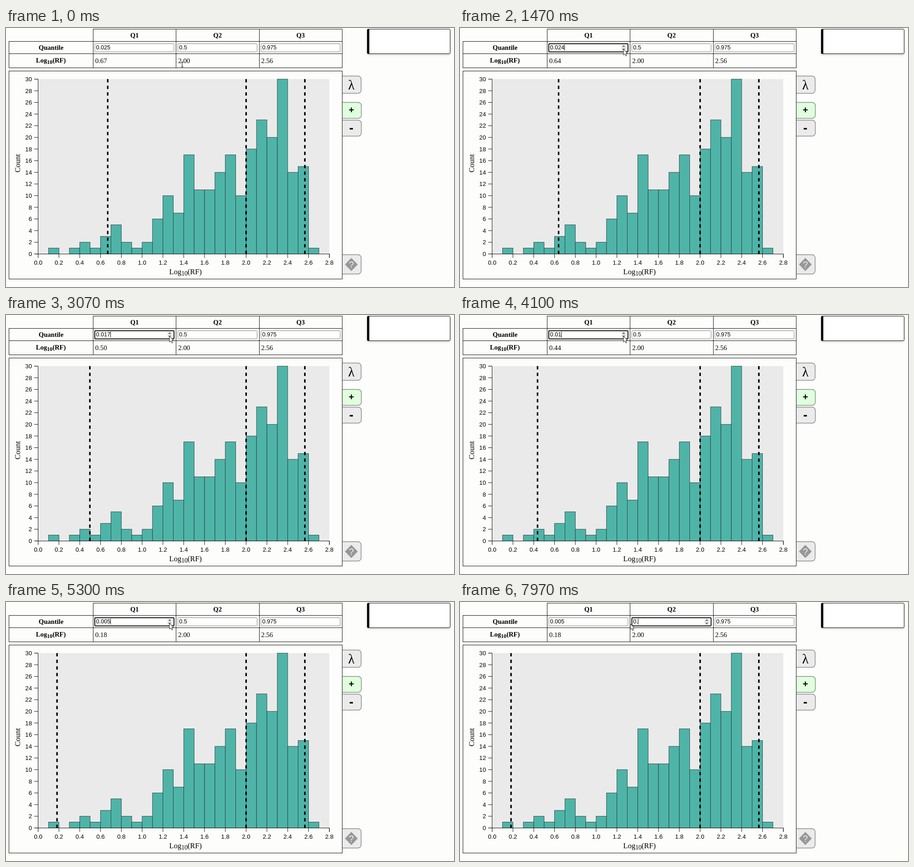
An HTML page that plays this animation: 984x569 px, repeating every 8000 ms.

```html
<!DOCTYPE html>
<html lang="en">
<head>
<meta charset="utf-8">
<title>Quantile histogram</title>
<style>
html, body { margin: 0; width: 100%; height: 100%; overflow: hidden; background: #fdfdfb; }
svg { display: block; width: 984px; height: 569px; }
text { white-space: pre; }
.serif { font-family: "Liberation Serif", "Times New Roman", serif; }
.sans { font-family: "Liberation Sans", Arial, sans-serif; }
.mid { text-anchor: middle; }
.end { text-anchor: end; }
.bold { font-weight: bold; }
</style>
</head>
<body>
<svg id="stage" viewBox="0 0 984 569"></svg>
<script>
const LOOP = 8000;
const stage = document.getElementById('stage');

function add(tag, attrs, content, parent = stage) {
  const el = document.createElementNS('http://www.w3.org/2000/svg', tag);
  for (const k in attrs) el.setAttribute(k, attrs[k]);
  if (content !== undefined) el.textContent = content;
  parent.appendChild(el);
  return el;
}
const label = (x, y, size, cls, str) => add('text', { x, y, 'font-size': size, class: cls }, str);
const line = (d, color = '#111', w = 1) => add('path', { d, fill: 'none', stroke: color, 'stroke-width': w });
const show = (el, on) => el.setAttribute('visibility', on ? 'visible' : 'hidden');

function logLabel(x, y, size, cls) {
  const t = label(x, y, size, cls, 'Log');
  add('tspan', { dy: 3, 'font-size': size * 0.83 }, '10', t);
  add('tspan', { dy: -3 }, '(RF)', t);
}

// Floating message box
const filter = add('filter', { id: 'soft', x: '-10%', y: '-20%', width: '120%', height: '150%' });
add('feDropShadow', { dx: 0, dy: 2, stdDeviation: 2, 'flood-opacity': 0.2 }, undefined, filter);
add('rect', { x: 793.5, y: 2.5, width: 182, height: 54, rx: 2.5, fill: '#fff', stroke: '#111', filter: 'url(#soft)' });
add('path', { d: 'M798 2H796Q793 2 793 6V53Q793 57 796 57H798Z', fill: '#000' });

// Side buttons, tucked behind the chart panel
function button(y, w, h, fill) {
  add('rect', { x: 725, y, width: w - 725, height: h, rx: 7, fill, stroke: '#8c8c8c', 'stroke-width': 1.5 });
}
button(105.5, 780, 38, '#ebebeb');
button(163.5, 780.5, 35, '#dfffdd');
button(202.5, 780.5, 35, '#ebebeb');
button(498, 780, 42.5, '#ebebeb');
label(758.5, 135, 29, 'serif mid', 'λ');
label(758.5, 187, 20, 'sans mid bold', '+');
label(758.5, 229, 28, 'sans mid bold', '-');
add('path', { d: 'M758.5 505L772.5 519.5L758.5 534L744.5 519.5Z', fill: '#979797' });
label(758.5, 526.5, 20, 'sans mid', '?').setAttribute('fill', '#f1f1f1');

// Table
line('M191 2.5H738.5M6 29.5H738.5M6 56.5H738.5M6 87.5H738.5M6.5 29V88M191.5 2V88M373.5 2V88M556.5 2V88M738.5 2V88');
['Q1', 'Q2', 'Q3'].forEach((q, i) => label(282.3 + i * 182.4, 21, 14.6, 'serif mid bold', q));
label(99, 48, 14.6, 'serif mid bold', 'Quantile');
logLabel(98.5, 76, 14.6, 'serif mid bold');
const rf = [196, 378.3, 560.5].map((x, i) => label(x, 77, 14.8, 'serif', ['', '2.00', '2.56'][i]));

function makeField(x) {
  const box = add('rect', { x: x + 0.5, y: 34.5, width: 174, height: 18, rx: 2, fill: '#fff' });
  const text = label(x + 3.2, 47, 12.6, 'sans', '');
  const caret = add('rect', { y: 36.5, width: 1, height: 13, fill: '#000' });
  const spin = add('g', {});
  add('rect', { x: x + 159, y: 36, width: 13, height: 15, fill: '#f0f0f0' }, undefined, spin);
  add('path', { d: `M${x + 161.5} 41.7h7l-3.5-4.4zM${x + 161.5} 45.3h7l-3.5 4.4z`, fill: '#777' }, undefined, spin);
  return {
    set(str, focus, hover, blink) {
      text.textContent = str;
      box.setAttribute('stroke', focus ? '#101010' : '#808080');
      box.setAttribute('stroke-width', focus ? 2 : 1);
      const width = [...str].reduce((w, c) => w + (c === '.' ? 0.278 : 0.556), 0) * 12.6;
      caret.setAttribute('x', x + 3.2 + width);
      show(caret, focus && blink);
      show(spin, focus || hover);
    }
  };
}
const fields = [194.5, 377, 559.5].map(makeField);

// Histogram
const X = v => 70.6 + v * 228.4;
const Y = n => 496.3 - n * 12.8;
const counts = [0, 1, 0, 1, 2, 1, 3, 5, 2, 1, 2, 6, 10, 7, 17, 11, 11, 14, 17, 10, 18, 23, 20, 30, 14, 15, 1];
add('rect', { x: 6.5, y: 94.5, width: 732, height: 457, fill: '#fdfdfb', stroke: '#111' });
add('rect', { x: 70.5, y: 112.3, width: 639.5, height: 384, fill: '#eaeaea' });
counts.forEach((n, i) => {
  if (n) add('rect', { x: X(i / 10), y: Y(n), width: 22.84, height: n * 12.8, fill: '#4fb4a8', stroke: '#263f3c', 'stroke-width': 0.9 });
});
line('M62 112.5H70.5V496.5H62M70.5 505V496.5H710.5V505');
for (let n = 0; n <= 30; n += 2) {
  line(`M62 ${Y(n)}H70.5`);
  label(57, Y(n) + 4.7, 13.2, 'sans end', n);
}
for (let i = 0; i <= 14; i++) {
  line(`M${X(i / 5)} 496.5V505`);
  label(X(i / 5), 519.5, 13.2, 'sans mid', (i / 5).toFixed(1));
}
logLabel(394.3, 541, 16.5, 'serif mid');
add('text', { transform: 'translate(31 297) rotate(-90)', 'font-size': 16.5, class: 'serif mid' }, 'Count');

function marker(v) {
  const el = line('M0 112.3V496.3', '#000', 3.3);
  el.setAttribute('stroke-dasharray', '7.25');
  el.setAttribute('transform', `translate(${X(v)} 0)`);
  return el;
}
const [q1Line] = [0, 2, 2.565].map(marker);

// Pointer
const arrow = add('path', { d: 'M0 0V12.5L3 9.8L5.2 14.6L7.3 13.6L5.2 9H9.2Z', fill: '#fff', stroke: '#222', 'stroke-width': 1 });
const beam = line('M-2.5 -5.5H-.8L0 -4.8L.8 -5.5H2.5M0 -5V5M-2.5 5.5H-.8L0 4.8L.8 5.5H2.5', '#222', 1.1);

// Lowest observations; the quantile interpolates between neighbours
const lowest = [0.125, 0.395, 0.494, 0.495, 0.517, 0.668, 0.69];
function quantile(p) {
  const h = 242 * p, k = Math.floor(h);
  return lowest[k - 1] + (h - k) * (lowest[k] - lowest[k - 1]);
}

const path = [[0, 387, 80], [250, 387, 80], [950, 359, 47], [5450, 359, 47], [6350, 441, 45], [6850, 441, 45], [7350, 374, 48], [LOOP, 374, 48]];
function pointer(t) {
  const i = path.findIndex(p => p[0] > t);
  const [a, b] = [path[i - 1], path[i]];
  const u = (t - a[0]) / (b[0] - a[0]);
  const e = u * u * (3 - 2 * u);
  return [a[1] + (b[1] - a[1]) * e, a[2] + (b[2] - a[2]) * e];
}

// One click, then a held spin button
function steps(t) {
  if (t < 1300) return 0;
  if (t < 1945) return 1;
  return Math.min(20, 2 + Math.floor((t - 1945) / 165));
}

function draw(t) {
  const p = (25 - steps(t)) / 1000;
  const value = quantile(p);
  const [x, y] = pointer(t);
  const inRow = y > 34 && y < 53;
  const over1 = inRow && x > 194 && x < 369;
  const over2 = inRow && x > 377 && x < 552;
  const onText = (over1 && x < 353) || (over2 && x < 535) || (y > 68 && x > 377);
  const focus = t < 1300 ? -1 : t < 6880 ? 0 : 1;
  const blink = t < 5100 || t > 7500 || (t - (focus ? 6880 : 5100)) % 1000 < 500;

  fields[0].set(String(p), focus === 0, over1, blink);
  fields[1].set(t < 7800 ? '0.5' : '0.', focus === 1, over2, blink);
  fields[2].set('0.975', false, false, false);
  rf[0].textContent = value.toFixed(2);
  q1Line.setAttribute('transform', `translate(${X(value)} 0)`);
  for (const c of [arrow, beam]) c.setAttribute('transform', `translate(${x} ${y})`);
  show(arrow, !onText);
  show(beam, onText);
}

const start = performance.now();
function tick() {
  draw((performance.now() - start) % LOOP);
  requestAnimationFrame(tick);
}
tick();
</script>
</body>
</html>
```
